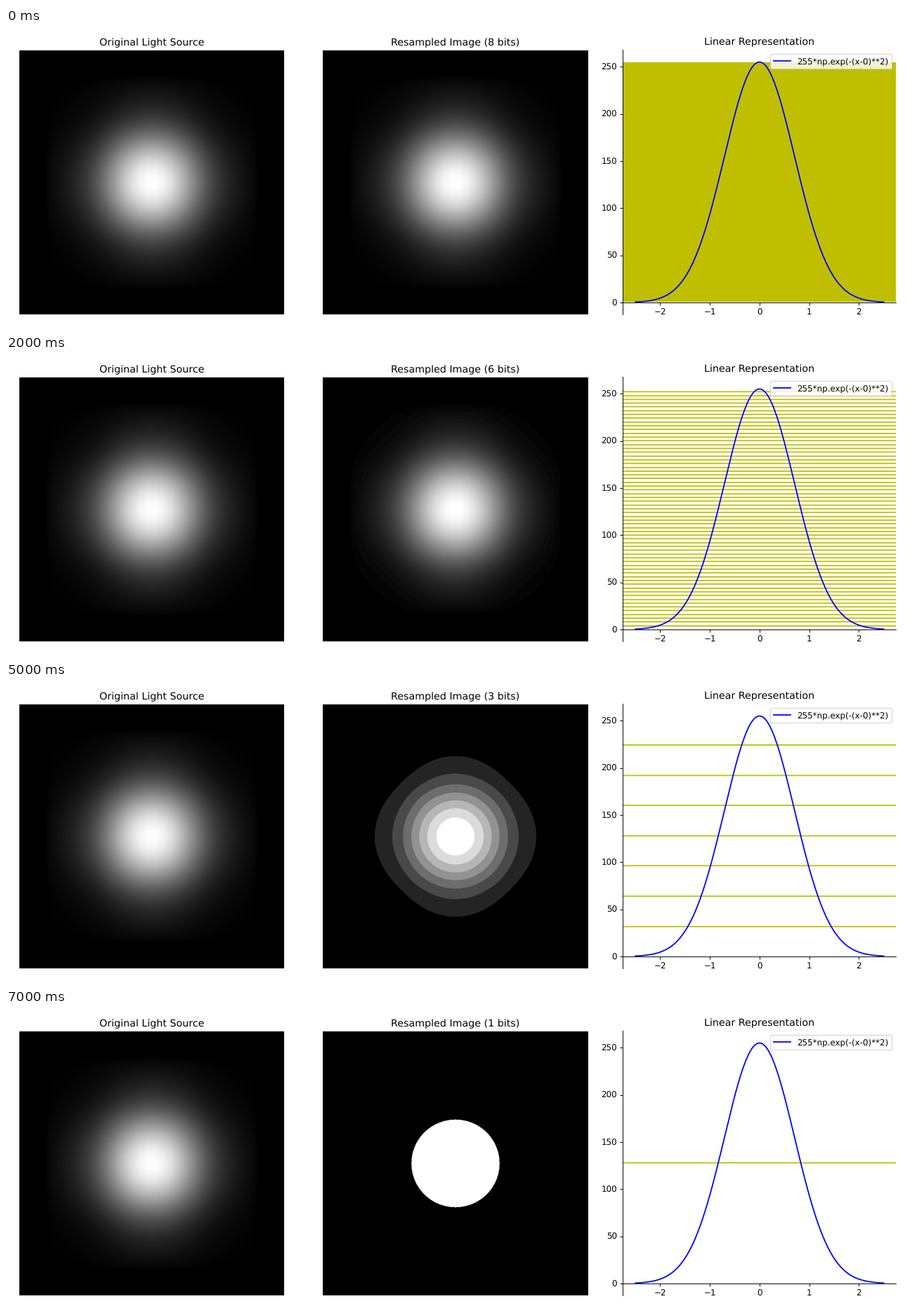
A matplotlib script for the animation above (8 s loop, 1280 by 427 pixels).

```python
import numpy as np
import matplotlib.pyplot as plt
from matplotlib.animation import FuncAnimation

W, H = 1280, 427
DPI = 256 / 3
MAX_BITS = 8
GRID = 1500 / W  # rule positions are rounded on this finer pixel grid

plt.rcParams["font.family"] = "DejaVu Sans"
plt.rcParams["text.hinting"] = "none"


def add_axes(left, right, top, bottom, title):
    """Axes placed by pixel edges, measured from the top left corner."""
    ax = fig.add_axes([left / W, 1 - bottom / H,
                       (right - left) / W, (bottom - top) / H])
    ax.set_title(title)
    return ax


def profile(x):
    """Gaussian core with straighter flanks that drops to zero near |x| = 2."""
    x = np.abs(x)
    core = np.exp(-np.where(x < 1, x**2, 2 * x - 1))
    return core * np.sqrt(np.clip(1 - (x / 2.008) ** 10, 0, 1))


def resample(bits):
    """Reduce the light to the given bit depth, scaled back to 0..255."""
    level = np.floor(light / 2 ** (MAX_BITS - bits))
    return level * 255 / (2**bits - 1)


def add_image(left, right, title):
    ax = add_axes(left, right, 32, 409, title)
    ax.axis("off")
    return ax, ax.imshow(resample(MAX_BITS), cmap="gray", vmin=0, vmax=255,
                         aspect="auto")


def rule_points(step):
    """Horizontal rules at every step, as one line broken by gaps."""
    values = np.arange(step, 255, step)
    px = plot.transData.transform(np.column_stack([0 * values, values]))
    px = np.round(px * GRID) / GRID
    y = plot.transData.inverted().transform(px)[:, 1]
    return np.tile([-2.75, 2.75, np.nan], len(y)), np.repeat(y, 3)


fig = plt.figure(figsize=(W / DPI, H / DPI), dpi=DPI, facecolor="white")

n = 756
axis = (np.arange(n) + 0.5) / n * 5 - 2.5
light = 255 * np.outer(profile(axis), profile(axis))

add_image(19, 396, "Original Light Source")
sample_ax, sample = add_image(451, 829, "")

plot = add_axes(878.4, 1267.3, 31.4, 408.6, "Linear Representation")
rules, = plot.plot([], [], color="y", lw=1.5, snap=False)
x = np.linspace(-2.5, 2.5, 201)
curve, = plot.plot(x, 255 * np.exp(-x**2), color="blue", lw=1.5,
                   label="255*np.exp(-(x-0)**2)")
plot.set_xlim(-2.75, 2.75)
plot.set_ylim(-12.3, 267.73)
plot.set_xticks(range(-2, 3))
plot.set_yticks(range(0, 251, 50))
plot.spines[["top", "right"]].set_visible(False)
plot.spines["bottom"].set_position(("data", 0))
plot.legend(handles=[curve], loc="upper right")


def update(i):
    bits = MAX_BITS - i % MAX_BITS
    sample.set_data(resample(bits))
    sample_ax.set_title(f"Resampled Image ({bits} bits)")
    rules.set_data(*rule_points(2 ** (MAX_BITS - bits)))
    return sample, sample_ax.title, rules


anim = FuncAnimation(fig, update, frames=MAX_BITS, interval=1000,
                     init_func=lambda: update(0), repeat=True, repeat_delay=0,
                     blit=False)
plt.show()
```
